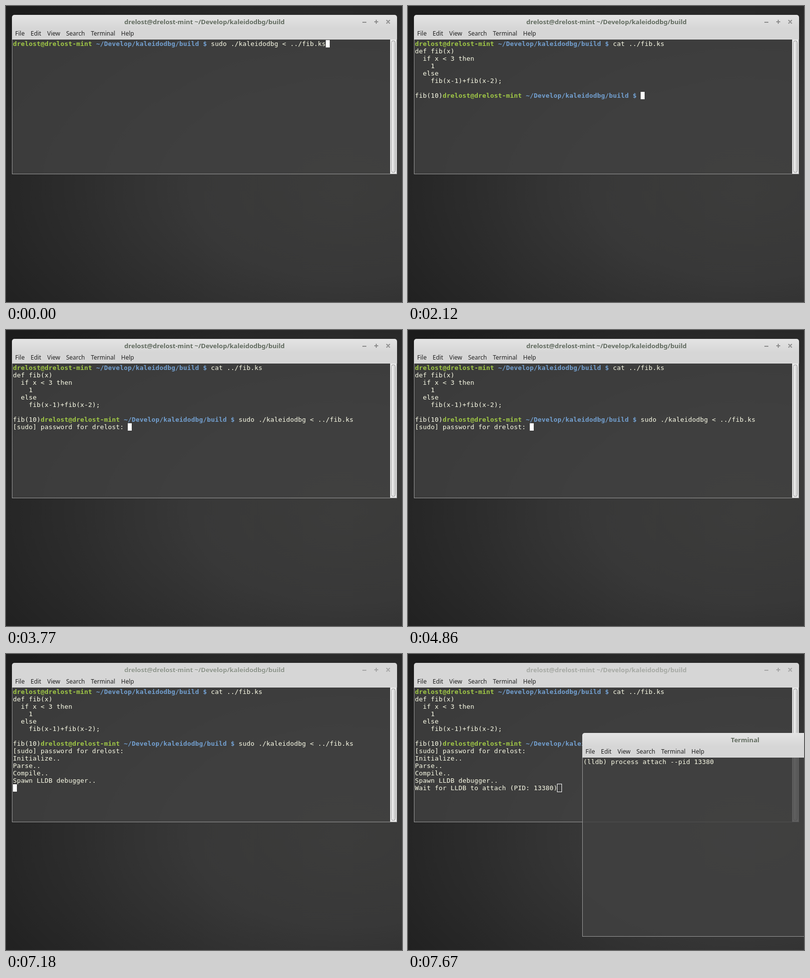
An HTML page that plays this animation: 800 by 600 pixels, repeating every 8 s.

```html
<!DOCTYPE html>
<html lang="en">
<head>
<meta charset="utf-8">
<title>Terminal session</title>
<style>
html, body { margin: 0; width: 100%; height: 100%; overflow: hidden; background: #1c1c1c; }
[hidden] { display: none !important; }
.stage {
  position: relative; width: 800px; height: 600px; overflow: hidden;
  background: radial-gradient(ellipse 900px 520px at 690px 370px,
    #3c3c3b 0, #383838 35%, #2b2b2b 65%, #1c1c1c 100%);
}
.win { position: absolute; }
#main { left: 12px; top: 18px; width: 778px; height: 323px; }
#debugger { left: 352px; top: 160px; width: 658px; height: 413px; }

.head {
  position: absolute; inset: 0 0 auto; height: 50px; border-radius: 5px 5px 0 0;
  background: linear-gradient(#e4e4e4, #d6d6d6 27px);
  font-family: "Noto Sans", sans-serif;
}
.title {
  height: 28px; text-align: center; white-space: nowrap;
  font-size: 13.05px; font-weight: bold; line-height: 28px;
  color: #606a5e; text-shadow: 0 1px rgba(255, 255, 255, .4);
}
.menu {
  position: absolute; left: 6.5px; top: 28px; display: flex; gap: 12px;
  font-size: 12px; line-height: 19px; color: #222;
}
.buttons { position: absolute; right: 12px; top: 8px; fill: none; stroke: #8d8d8d; stroke-width: 2; }
.fading .head, .dim .head { background: #d6d6d6; }
.fading .title { color: #8c938a; text-shadow: 0 1px #eee; }
.dim .title { color: #a7aaa5; text-shadow: none; }
.fading .buttons, .dim .buttons { stroke: #a6a6a6; }

.term {
  position: absolute; inset: 50px 0 0; box-sizing: border-box;
  border: solid #999; border-width: 0 1px 1px;
  background: rgba(65, 65, 65, .82);
  font: 13px/15px "DejaVu Sans Mono", monospace; color: #fcfde8;
  letter-spacing: calc(8px - 1ch);
}
.term pre, .cursor {
  --r: 0; --c: 0;
  position: absolute; margin: 0; font: inherit;
  left: calc(1px + var(--c) * 8px); top: calc(1px + var(--r) * 15px);
}
.term b { color: #a0c846; }
.term i { color: #729fcf; font-style: normal; }
.cursor { width: 8px; height: 15px; background: #fff; }
.cursor.hollow {
  box-sizing: border-box; width: 10px; height: 17px; margin: -1px;
  background: none; border: 1px solid #fff;
}
.scroll { position: absolute; right: 0; top: 0; bottom: 0; width: 13px; background: #e9e9e9; }
.scroll::after {
  content: ""; position: absolute; inset: 2px; box-sizing: border-box;
  border: 1px solid #999; border-radius: 5px;
  background: linear-gradient(90deg, #f0f0f0, #d2d2d2);
}
</style>
</head>
<body>
<div class="stage">
  <div class="win" id="main">
    <div class="head">
      <div class="title">drelost@drelost-mint ~/Develop/kaleidodbg/build</div>
      <svg class="buttons" width="60" height="12" viewBox="0 0 60 12">
        <path d="M2 7h8M26 6h8M30 2v8M50.5 2.5l7 7M57.5 2.5l-7 7"/>
      </svg>
      <div class="menu"><span>File</span><span>Edit</span><span>View</span><span>Search</span><span>Terminal</span><span>Help</span></div>
    </div>
    <div class="term">
      <pre><b>drelost@drelost-mint <i>~/Develop/kaleidodbg/build $</i></b></pre>
      <pre style="--c:50" data-on="0-970">sudo ./kaleidodbg &lt; ../fib.ks</pre>
      <pre style="--c:50" data-on="970-8000">cat ../fib.ks</pre>
      <pre style="--r:1" data-on="2120-8000">def fib(x)
  if x &lt; 3 then
    1
  else
    fib(x-1)+fib(x-2);

fib(10)<b>drelost@drelost-mint <i>~/Develop/kaleidodbg/build $</i></b></pre>
      <pre style="--r:7;--c:57" data-on="3320-3430">cat ../fib.ks</pre>
      <pre style="--r:7;--c:57" data-on="3430-8000">sudo ./kaleidodbg &lt; ../fib.ks</pre>
      <pre style="--r:8" data-on="3770-8000">[sudo] password for drelost:</pre>
      <pre style="--r:9" data-on="6840-8000">Initialize..
Parse..
Compile..
Spawn LLDB debugger..</pre>
      <pre style="--r:13" data-on="7220-8000">Wait for LLDB to attach (PID: 13380)</pre>

      <div class="cursor" style="--c:79" data-on="0-550 930-970"></div>
      <div class="cursor" style="--c:63" data-on="970-1520 2080-2120"></div>
      <div class="cursor" style="--r:7;--c:57" data-on="2120-2720"></div>
      <div class="cursor" style="--r:7;--c:70" data-on="3320-3430"></div>
      <div class="cursor" style="--r:7;--c:86" data-on="3430-3770"></div>
      <div class="cursor" style="--r:8;--c:29" data-on="3770-4390 4860-6840"></div>
      <div class="cursor" style="--r:13" data-on="6840-7220"></div>
      <div class="cursor hollow" style="--r:13;--c:36" data-on="7220-8000"></div>
      <div class="scroll"></div>
    </div>
  </div>

  <div class="win" id="debugger" data-on="7220-8000" hidden>
    <div class="head">
      <div class="title">Terminal</div>
      <div class="menu"><span>File</span><span>Edit</span><span>View</span><span>Search</span><span>Terminal</span><span>Help</span></div>
    </div>
    <div class="term">
      <pre>(lldb) process attach --pid 13380</pre>
      <div class="cursor" style="--r:1" data-on="7220-7670"></div>
    </div>
  </div>
</div>
<script>
const LOOP = 8000;
const main = document.getElementById('main');

// Each data-on attribute lists the spans, in ms, in which its element shows.
const parts = [...document.querySelectorAll('[data-on]')].map(el => ({
  el,
  spans: el.dataset.on.split(' ').map(s => s.split('-').map(Number))
}));

function draw(t) {
  for (const { el, spans } of parts) {
    el.hidden = !spans.some(([from, to]) => t >= from && t < to);
  }
  main.className = t < 7180 ? 'win' : t < 7220 ? 'win fading' : 'win dim';
}

const start = performance.now();
function tick() {
  draw((performance.now() - start) % LOOP);
  requestAnimationFrame(tick);
}
draw(0);
requestAnimationFrame(tick);
</script>
</body>
</html>
```
